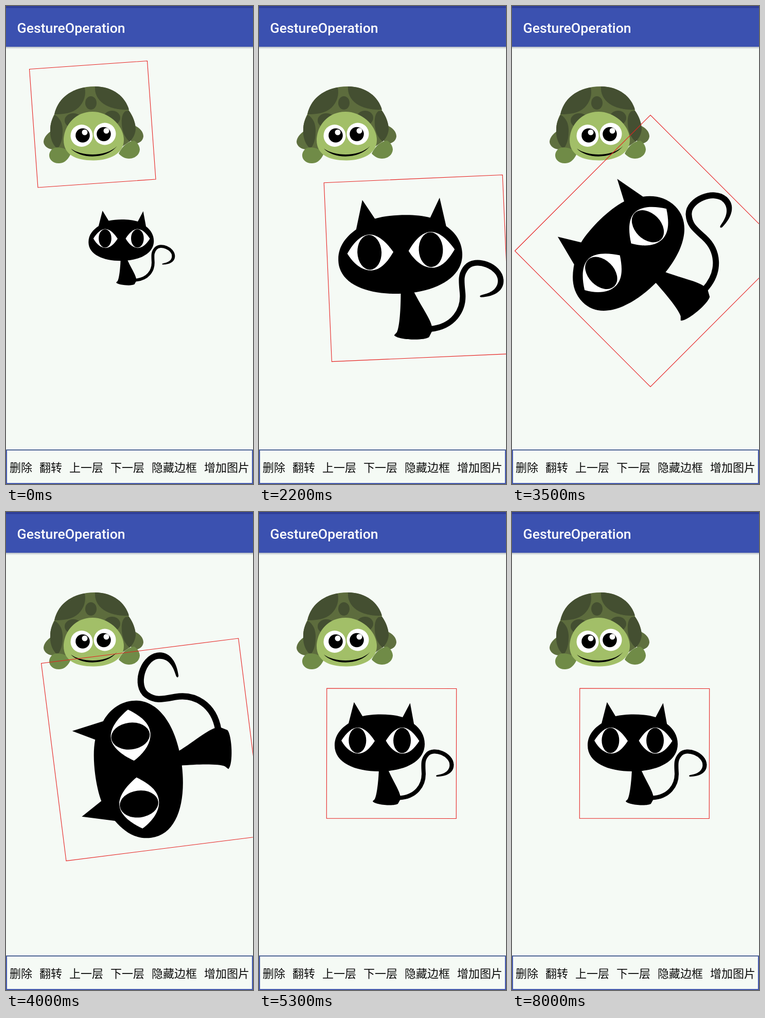
An HTML page that plays this animation: 480 by 927 pixels, repeating every 8.1 s.

```html
<!DOCTYPE html>
<html lang="zh-CN">
<head>
<meta charset="utf-8">
<title>GestureOperation</title>
<style>
html, body { margin: 0; width: 100%; height: 100%; overflow: hidden; background: #f5faf5; }
svg { display: block; width: 100%; height: 100%; }
.title { font: 500 26.67px Roboto, sans-serif; fill: #fff; }
.menu { font: 22px "Noto Sans CJK SC", "Noto Sans CJK", sans-serif; fill: #0a0a0a; }
.frame { fill: none; stroke: #e62020; stroke-width: 1.1; vector-effect: non-scaling-stroke; }
.dark { fill: #444f31; }
.back { fill: #5f703f; }
.paw { fill: #708b47; }
</style>
</head>
<body>
<svg viewBox="0 0 480 927" preserveAspectRatio="none">
  <defs>
    <linearGradient id="shade" x2="0" y2="1">
      <stop offset="0" stop-color="#8f97a8" stop-opacity=".75"/>
      <stop offset="1" stop-color="#c8cfd0" stop-opacity="0"/>
    </linearGradient>
    <path id="almond" d="M-32 0C-22-16-11-25.5 0-25.5C13-25.5 25-12 33 .5C23 16 13 25 1 25C-11 25-23 16-32 0Z"/>
  </defs>
  <rect width="480" height="927" fill="#f5faf5"/>

  <g id="turtle">
    <path class="back" d="M87 243C78 249 73 257 73 264C74 272 82 278 92 278L108 270Z"/>
    <path class="back" d="M250 232C260 236 267 244 267 253C266 262 258 267 250 267L238 258Z"/>
    <path fill="#5d6c3d" d="M86 240C86 228 90 217 94 210C102 178 130 156 172 156C208 156 232 176 239 203C247 214 252 228 252 239C251 250 246 258 240 263L200 290L120 285C100 278 86 262 86 240Z"/>
    <path class="dark" d="M94 210C100 182 122 163 153 158C156 172 152 186 141 197C129 208 113 210 94 210Z"/>
    <path class="dark" d="M173 156C208 156 232 176 239 201C220 202 202 198 190 190C177 181 172 169 173 156Z"/>
    <path class="dark" d="M95 211C106 218 111 230 110 245C110 259 106 270 100 277C90 269 85 254 86 240C86 228 90 217 95 211Z"/>
    <path class="dark" d="M239 203C247 214 252 228 252 239C251 250 246 258 240 263C230 254 226 243 225 230C224 218 226 208 232 204Z"/>
    <ellipse class="dark" cx="165" cy="188" rx="11" ry="13"/>
    <ellipse class="dark" cx="131" cy="222" rx="17" ry="14"/>
    <ellipse class="dark" cx="206" cy="217" rx="16" ry="14"/>
    <path class="paw" d="M92 276C100 272 118 275 126 286C122 296 114 305 104 305C92 306 84 298 84 290C84 284 87 279 92 276Z"/>
    <path class="paw" d="M219 286C226 271 238 262 249 261C255 264 260 272 260 279C259 289 250 296 239 296C231 296 224 292 219 286Z"/>
    <path fill="#a2bf68" d="M112 260C112 235 132 205 168 205C200 205 229 232 229 260C229 285 203 299.5 170 299.5C135 299.5 112 288 112 260Z"/>
    <circle cx="147" cy="251.500" r="21.500" fill="#fff"/>
    <circle cx="192" cy="248" r="21.500" fill="#fff"/>
    <circle cx="149" cy="251" r="13.800"/>
    <circle cx="190" cy="248.500" r="13.800"/>
    <circle cx="153" cy="245" r="5.500" fill="#fff"/>
    <circle cx="195" cy="242" r="5.500" fill="#fff"/>
    <path d="M126 276.500C145 297 195 298 216 271.500C195 293 147 292 126 276.500Z"/>
  </g>
  <path id="turtleFrame" class="frame" d="M45.500 122.500L274.500 106.500L291 336L62 352Z"/>

  <g id="cat">
    <g transform="translate(-257.500 -468.300)">
      <path d="M147 453C147 433 159 420 174 410L184.500 369L201 396C222 391 258 391 279 398L293.500 370.500L301 411C313 420 322 433 322 450C322 484 283 503 234 503C186 503 147 486 147 453Z"/>
      <path d="M233 500C232 525 229 550 225 557L221 561C226 568 262 571 270 566L275 557C277 545 262 525 251 500Z"/>
      <path d="M272 554.500C305 553 321 530 320 506C319 488 318 480 327 470C340 456 374 470 374.500 490" fill="none" stroke="#000" stroke-width="8"/>
      <path d="M378.500 489C379.500 505 365 513 346 513C343 512 344 510 348 509.500C358 508 371 503 370.500 489Z"/>
      <g fill="#fff">
        <use href="#almond" x="192" y="443.500"/>
        <use href="#almond" x="278.500" y="443.500"/>
      </g>
      <ellipse cx="191.300" cy="443" rx="17" ry="24.500"/>
      <ellipse cx="278" cy="443" rx="17" ry="24.500"/>
    </g>
    <rect id="catFrame" class="frame" x="-126" y="-126" width="252" height="252"/>
  </g>

  <rect width="480" height="79" fill="#3b51b0"/>
  <rect width="480" height="4" fill="#2f3f99"/>
  <rect y="79" width="480" height="5" fill="url(#shade)"/>
  <text class="title" x="21.500" y="51.500">GestureOperation</text>

  <rect x="1" y="861" width="478" height="65" fill="none" stroke="#4459ae" stroke-width="2"/>
  <rect y="860" width="480" height="2" fill="#4f6597"/>
  <g id="menu" class="menu"></g>
</svg>
<script>
const LOOP = 8100, STEP = 100, TAP = 700;
const $ = id => document.getElementById(id);

const labels = [["删除", 7], ["翻转", 65], ["上一层", 123], ["下一层", 203], ["隐藏边框", 283], ["增加图片", 385]];
$("menu").innerHTML = labels.map(([s, x]) => `<text x="${x}" y="902.5">${s}</text>`).join("");

// time, centre x, centre y, side, angle
const poses = [
  [800, 240.5, 469, 183, 0],
  [1300, 231.7, 450, 278.6, -2],
  [1700, 250, 462, 347.7, -2.5],
  [2200, 307.3, 508.6, 347.7, -2.5],
  [2400, 302, 549, 347.7, -2.5],
  [2800, 256.7, 473.5, 347.7, -2.5],
  [3000, 257, 474, 348, -2.5],
  [3500, 269, 475, 373, -45],
  [3700, 275, 469, 378, -63],
  [4000, 284.3, 460.8, 386.6, -97.2],
  [4500, 270, 462, 280, -12],
  [4800, 257.5, 468.3, 252.3, 0.1]
];

function poseAt(t) {
  const i = poses.findIndex(p => p[0] > t);
  if (i === 0) return poses[0];
  if (i < 0) return poses[poses.length - 1];
  const a = poses[i - 1], b = poses[i];
  const k = (t - a[0]) / (b[0] - a[0]);
  return a.map((v, j) => v + (b[j] - v) * k);
}

const show = (id, on) => $(id).setAttribute("visibility", on ? "visible" : "hidden");

function draw(ms) {
  const t = Math.floor((ms % LOOP) / STEP) * STEP;
  const [, x, y, side, angle] = poseAt(t);
  $("cat").setAttribute("transform", `translate(${x} ${y}) rotate(${angle}) scale(${side / 252.3})`);
  show("turtleFrame", t < TAP);
  show("catFrame", t >= TAP);
}

const start = performance.now();
function tick() {
  draw(performance.now() - start);
  requestAnimationFrame(tick);
}
tick();
</script>
</body>
</html>
```
